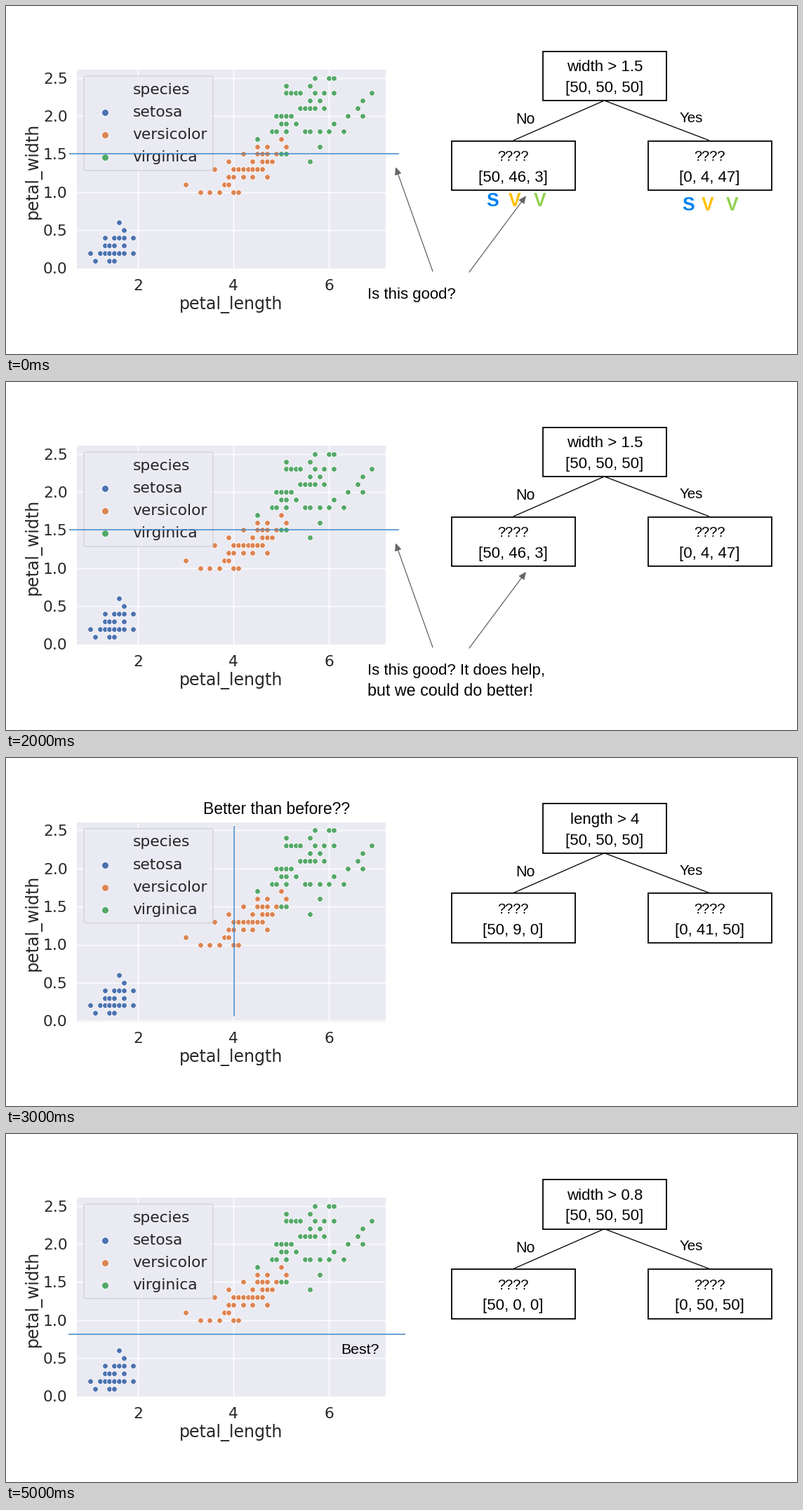
Recreate the animation shown at these times as a matplotlib script. Size 1127x497 px, loop 6000 ms.

```python
import matplotlib.pyplot as plt
from matplotlib.animation import FuncAnimation
from matplotlib.patches import FancyArrowPatch, FancyBboxPatch, Rectangle

W, H, DPI = 1127, 497, 64
PX = 72 / DPI  # points per pixel

PLOT_FONT, SLIDE_FONT = "DejaVu Sans", "Liberation Sans"
INK, PANEL = "#262626", "#eaeaf2"
SPLIT_BLUE, ARROW_GRAY = "#3f87c6", "#666666"
BLUE, AMBER, LIME = "#0080f0", "#ffc000", "#92d050"

# Petal lengths in tenths of a cm, keyed by petal width in tenths.
SETOSA = {
    1: [11, 14, 15],
    2: [10, *range(12, 18), 19],
    3: [13, 14, 15, 17],
    4: [13, 15, 16, 17, 19],
    5: [17],
    6: [16],
}
VERSICOLOR = {
    10: [33, 35, 37, 40, 41],
    11: [30, 38, 39],
    12: [39, 40, 42, 44, 47],
    13: [36, *range(40, 47)],
    14: [39, 44, 46, 47, 48],
    15: [42, 45, 46, 47, 49],
    16: [45, 47, 51],
    17: [50],
}
VIRGINICA = {
    14: [56],
    15: [50, 51],
    16: [58],
    17: [45],
    18: [48, 49, 51, 55, 56, 58, 60, 63],
    19: [50, 51, 53, 61],
    20: [49, 50, 51, 52, 64, 67],
    21: [54, 55, 56, 57, 59, 66],
    22: [56, 58, 67],
    23: [51, 52, 53, 54, 57, 59, 61, 69],
    24: [51, 56],
    25: [57, 60, 61],
}
SPECIES = [
    ("setosa", "#4c72b0", SETOSA),
    ("versicolor", "#dd8452", VERSICOLOR),
    ("virginica", "#55a868", VIRGINICA),
]

# Each step: question at the root, counts in the leaves, split line, offsets.
WIDTH_SPLIT = dict(rule="width > 1.5", no="[50, 46, 3]", yes="[0, 4, 47]",
                   line=((90, 560), (211, 211)), plot_dy=0, tree_dy=0)
STEPS = [
    WIDTH_SPLIT,
    WIDTH_SPLIT,
    WIDTH_SPLIT,
    dict(rule="length > 4", no="[50, 9, 0]", yes="[0, 41, 50]",
         line=((324.5, 324.5), (97, 369)), plot_dy=0.7, tree_dy=0.7),
    dict(rule="width > 0.5", no="[2, 50, 50]", yes="[48, 0, 0]",
         line=((84, 552), (320, 320)), plot_dy=0, tree_dy=0.5),
    dict(rule="width > 0.8", no="[50, 0, 0]", yes="[0, 50, 50]",
         line=((89, 569), (286, 286)), plot_dy=0, tree_dy=0.5),
]

fig = plt.figure(figsize=(W / DPI, H / DPI), dpi=DPI, facecolor="white")
ax = fig.add_axes([0, 0, 1, 1])


def px_x(length):
    return 52.2 + 68 * length


def px_y(width):
    return 374.5 - 108.7 * width


def text(x, y, s, size=22.2, color="black", ha="center", font=SLIDE_FONT, **kw):
    ax.text(x, y, s, fontsize=size * PX, color=color, ha=ha, va="baseline",
            family=font, zorder=6, **kw)


def plot_text(x, y, s, size=21.8, **kw):
    text(x, y, s, size, INK, font=PLOT_FONT, **kw)


def line(xs, ys, color, width, zorder=5):
    ax.plot(xs, ys, color=color, lw=width * PX, zorder=zorder,
            solid_capstyle="butt")


def dots(xs, ys, color, size, zorder):
    ax.plot(xs, ys, "o", ms=size * PX, mfc=color, mec="white",
            mew=0.9 * PX, zorder=zorder)


def draw_legend(dy):
    ax.add_patch(FancyBboxPatch(
        (114, 103 + dy), 178, 129, boxstyle="round,pad=3,rounding_size=4",
        fc=PANEL, ec="#cccccc", lw=1.4 * PX, alpha=0.8, zorder=4))
    plot_text(180.5, 125.8 + dy, "species", ha="left")
    for row, (name, color, _) in enumerate(SPECIES):
        y = 152.3 + 32 * row + dy
        dots([141.3], [y], color, 10, 5)
        plot_text(180.5, y + 6, name, ha="left")


def draw_scatter(dy):
    ax.add_patch(Rectangle((101, 91 + dy), 440, 285, fc=PANEL, lw=0, zorder=0))
    for length in (2, 4, 6):
        x = px_x(length)
        line([x, x], [91 + dy, 376 + dy], "white", 1.4, 1)
        plot_text(x, 406 + dy, str(length))
    for half in range(6):
        y = px_y(half / 2) + dy
        line([101, 541], [y, y], "white", 1.4, 1)
        plot_text(87.8, y + 8, f"{half / 2:.1f}", ha="right")
    for _, color, rows in SPECIES:
        points = [(px_x(n / 10), px_y(w / 10) + dy)
                  for w, lengths in rows.items() for n in lengths]
        dots(*zip(*points), color, 7.8, 3)
    plot_text(320.5, 433 + dy, "petal_length", 23.7)
    plot_text(45, 235 + dy, "petal_width", 23.7, rotation=90,
              rotation_mode="anchor")
    draw_legend(dy)


def draw_node(x, y, title, counts, title_size=22.2):
    ax.add_patch(Rectangle((x - 88, y), 176, 70.7, fc="white", ec="black",
                           lw=1.8 * PX, zorder=5))
    text(x, y + 28.5, title, title_size)
    text(x, y + 58.5, counts)


def draw_tree(step):
    dy = step["tree_dy"]
    for x in (723, 1002):
        line([852.5, x], [135 + dy, 192 + dy], "black", 1.3)
    draw_node(853, 64.5 + dy, step["rule"], "[50, 50, 50]")
    draw_node(722.5, 192.5 + dy, "????", step["no"], 20)
    draw_node(1002.5, 192.5 + dy, "????", step["yes"], 20)
    text(739.5, 168.5 + dy, "No", 21.5)
    text(976, 166 + dy, "Yes", 20.5)


def draw_arrow(start, tip):
    ax.add_patch(FancyArrowPatch(
        start, tip, arrowstyle="-|>,head_length=9,head_width=4",
        mutation_scale=PX, shrinkA=0, shrinkB=0, color=ARROW_GRAY,
        lw=1.3 * PX, zorder=7))


def draw_initials(xs, baseline):
    for x, letter, color in zip(xs, "SVV", (BLUE, AMBER, LIME)):
        text(x, baseline, letter, 26.5, color, weight="bold")


def draw_remarks(i):
    if i == 0:
        draw_initials((693, 725, 761), 286)
        draw_initials((972, 1000, 1035), 292)
    if i < 3:
        draw_arrow((608, 379), (555, 230))
        draw_arrow((660, 380), (741, 271))
        tail = " It does help," if i == 2 else ""
        text(515, 418, "Is this good?" + tail, ha="left")
    if i == 2:
        text(515, 448, "but we could do better!", 23.3, ha="left")
    elif i == 3:
        text(385.5, 80, "Better than before??", 22.9)
    elif i == 4:
        text(477, 348, "Even better?")
    elif i == 5:
        text(504, 314, "Best?", 21.3)


def draw(i):
    ax.clear()
    ax.set(xlim=(0, W), ylim=(H, 0))
    ax.axis("off")
    step = STEPS[i]
    draw_scatter(step["plot_dy"])
    line(*step["line"], SPLIT_BLUE, 1.5, 7)
    draw_tree(step)
    draw_remarks(i)
    return []


anim = FuncAnimation(fig, draw, frames=len(STEPS), interval=1000, repeat=True)
plt.show()
```
